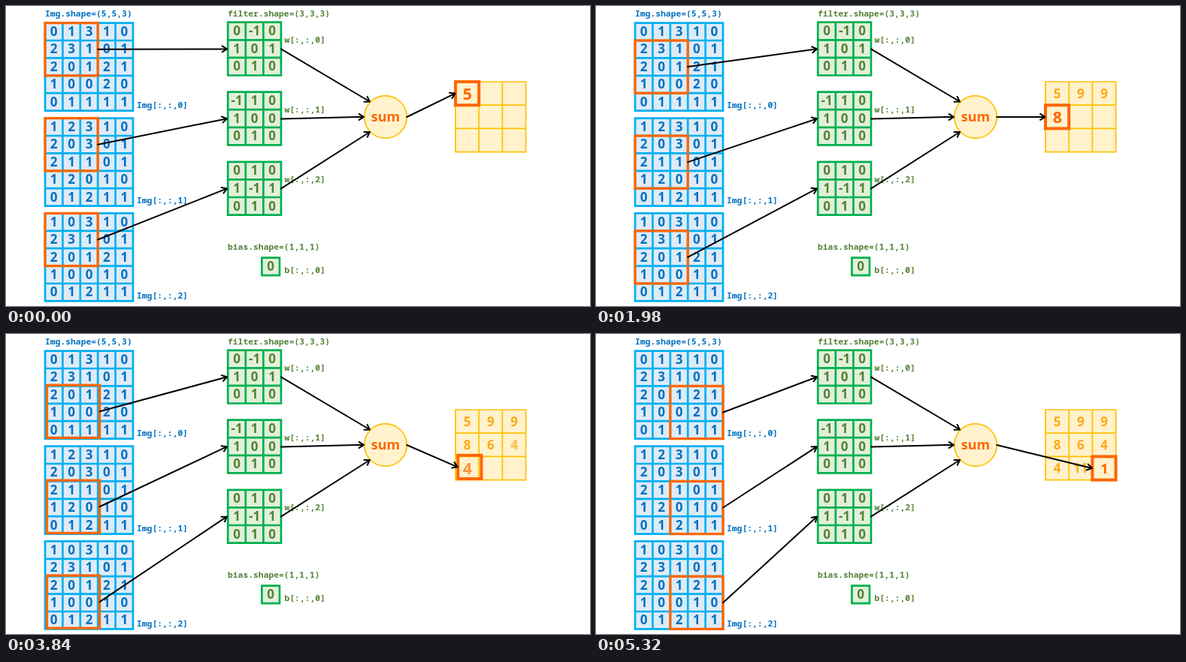
These frames come from a looping animation (777x400 px, 5.35 s). An HTML page:

```html
<!DOCTYPE html>
<html lang="en">
<head>
<meta charset="utf-8">
<title>Convolution over three channels</title>
<style>
  html, body { margin: 0; width: 100%; height: 100%; overflow: hidden; background: #fff; }
  svg { display: block; width: 777px; height: 400px; }
  text { font-family: "Open Sans", "Noto Sans", sans-serif; font-weight: 700; }
  .code { font-family: "Noto Sans Mono", "DejaVu Sans Mono", monospace; font-size: 11.35px; }
</style>
</head>
<body>
<svg id="stage" viewBox="0 0 777 400"></svg>
<script>
const NS = "http://www.w3.org/2000/svg";
const stage = document.getElementById("stage");

const BLUE = { line: "#00b0f0", fill: "#deebf7", text: "#0070c0" };
const GREEN = { line: "#00b050", fill: "#e2f0d9", text: "#548235" };
const GOLD = { line: "#ffc000", fill: "#fff2cc", text: "#fbaa19" };
const ORANGE = "#ff6600";

const LOOP = 5350;
const TICK = 30;
const MOVES = [
  [360, 12], [1020, 11], [1650, 12], [2310, 12],
  [2970, 11], [3600, 13], [4320, 11], [5020, 11]
];
const CELL = 23.4;
const OUT = { x: 598, y: 101, cell: 31.2 };
const IMG_X = 52;
const IMG_Y = [22.6, 149.6, 276.4];
const FILTER_Y = [21.7, 114.6, 207.8];
const SUM = { x: 505, y: 148, r: 28.3 };

const images = [
  "0 1 3 1 0 2 3 1 0 1 2 0 1 2 1 1 0 0 2 0 0 1 1 1 1",
  "1 2 3 1 0 2 0 3 0 1 2 1 1 0 1 1 2 0 1 0 0 1 2 1 1",
  "1 0 3 1 0 2 3 1 0 1 2 0 1 2 1 1 0 0 1 0 0 1 2 1 1"
];
const filters = ["0 -1 0 1 0 1 0 1 0", "-1 1 0 1 0 0 0 1 0", "0 1 0 1 -1 1 0 1 0"];
const results = [5, 9, 9, 8, 6, 4, 4, 11, 1];

function add(tag, attrs, content) {
  const el = document.createElementNS(NS, tag);
  for (const key in attrs) el.setAttribute(key, attrs[key]);
  if (content !== undefined) el.textContent = content;
  return stage.appendChild(el);
}

function label(x, y, content, fill) {
  return add("text", { x, y, fill, class: "code" }, content);
}

function number(x, y, content, fill, size) {
  return add("text", {
    x, y: y + size * 0.355, fill, "font-size": size, "text-anchor": "middle"
  }, content);
}

function grid(x, y, n, cell, theme, width) {
  const side = n * cell;
  add("rect", { x, y, width: side, height: side, fill: theme.fill });
  let d = `M${x} ${y}h${side}v${side}h${-side}z`;
  for (let i = 1; i < n; i++) {
    d += `M${x + i * cell} ${y}v${side}M${x} ${y + i * cell}h${side}`;
  }
  add("path", { d, fill: "none", stroke: theme.line, "stroke-width": width });
}

function matrix(x, y, n, cell, theme, values) {
  grid(x, y, n, cell, theme, 2.7);
  values.split(" ").forEach((v, i) => {
    number(x + (i % n + 0.5) * cell, y + (Math.floor(i / n) + 0.5) * cell - 0.3, v, theme.text, 17);
  });
}

function arrow() {
  return add("path", {
    fill: "none", stroke: "#000", "stroke-width": 2,
    "stroke-linecap": "round", "stroke-linejoin": "round"
  });
}

function aim(el, x1, y1, x2, y2) {
  const angle = Math.atan2(y2 - y1, x2 - x1);
  const barb = turn => `${x2 - 7.5 * Math.cos(angle + turn)} ${y2 - 7.5 * Math.sin(angle + turn)}`;
  el.setAttribute("d", `M${x1} ${y1}L${x2} ${y2}M${barb(0.56)}L${x2} ${y2}L${barb(-0.56)}`);
}

function frame(side, width) {
  return add("rect", { width: side, height: side, fill: "none", stroke: ORANGE, "stroke-width": width });
}

function place(el, x, y) {
  el.setAttribute("x", x);
  el.setAttribute("y", y);
}

// Static scene
label(52, 13.6, "Img.shape=(5,5,3)", BLUE.text);
images.forEach((values, i) => {
  matrix(IMG_X, IMG_Y[i], 5, CELL, BLUE, values);
  label(174, IMG_Y[i] + 113.2, `Img[:,:,${i}]`, BLUE.text);
});

label(295, 13.6, "filter.shape=(3,3,3)", GREEN.text);
filters.forEach((values, i) => {
  matrix(295.2, FILTER_Y[i], 3, 23.6, GREEN, values);
  label(370.5, FILTER_Y[i] + 27.2, `w[:,:,${i}]`, GREEN.text);
});

label(295, 325, "bias.shape=(1,1,1)", GREEN.text);
matrix(340.4, 335.6, 1, 23.6, GREEN, "0");
label(370.5, 355.8, "b[:,:,0]", GREEN.text);

grid(OUT.x, OUT.y, 3, OUT.cell, GOLD, 1.7);
add("circle", { cx: SUM.x, cy: SUM.y, r: SUM.r, fill: GOLD.fill, stroke: GOLD.line, "stroke-width": 1.7 });
add("text", { x: SUM.x, y: 153.6, fill: ORANGE, "font-size": 18, "text-anchor": "middle" }, "sum");

// Moving parts
const cells = results.map((value, i) => {
  const x = OUT.x + (i % 3 + 0.5) * OUT.cell;
  const y = OUT.y + (Math.floor(i / 3) + 0.5) * OUT.cell;
  return {
    calm: number(x, y, value, GOLD.text, 17),
    bright: number(x + 0.4, y + 0.4, value, ORANGE, i < 7 ? 21.5 : 18)
  };
});
const windows = IMG_Y.map(() => frame(3 * CELL, 3.3));
const outBox = frame(OUT.cell, 4);
const inArrows = IMG_Y.map(arrow);
[[57.4, 484, 127.5], [150.4, 476, 147.8], [243.4, 484, 168]].forEach(([y, tx, ty]) => {
  aim(arrow(), 366, y, tx, ty);
});
const outArrow = arrow();

// Current step, linear progress to the next one
function phase(t) {
  let step = 0;
  for (const [start, count] of MOVES) {
    if (t < start) break;
    const p = (Math.floor((t - start) / TICK) + 1) / count;
    if (p < 1) return [step, p];
    step++;
  }
  return [step, 0];
}

function render(t) {
  const [step, p] = phase(t);
  const next = Math.min(step + 1, 8);
  const e = 1 - Math.pow(1 - p, 2.5);
  const mix = (a, b) => a + (b - a) * e;
  const col = mix(step % 3, next % 3);
  const row = mix(Math.floor(step / 3), Math.floor(next / 3));

  windows.forEach((box, i) => {
    const x = IMG_X + col * CELL;
    const y = IMG_Y[i] + row * CELL;
    place(box, x, y);
    aim(inArrows[i], x + 3 * CELL, y + 1.5 * CELL, 294, FILTER_Y[i] + 35.6);
  });

  const ox = OUT.x + col * OUT.cell;
  const oy = OUT.y + row * OUT.cell;
  place(outBox, ox, oy);
  aim(outArrow, SUM.x + SUM.r, SUM.y, ox - 0.5, oy + OUT.cell / 2);

  cells.forEach(({ calm, bright }, i) => {
    calm.setAttribute("opacity", i < step ? 1 : i === step ? p : 0);
    bright.setAttribute("opacity", i === step ? 1 - e : i === next ? p : 0);
  });
}

const begin = performance.now();
function tick() {
  render((performance.now() - begin) % LOOP);
  requestAnimationFrame(tick);
}
tick();
</script>
</body>
</html>
```
